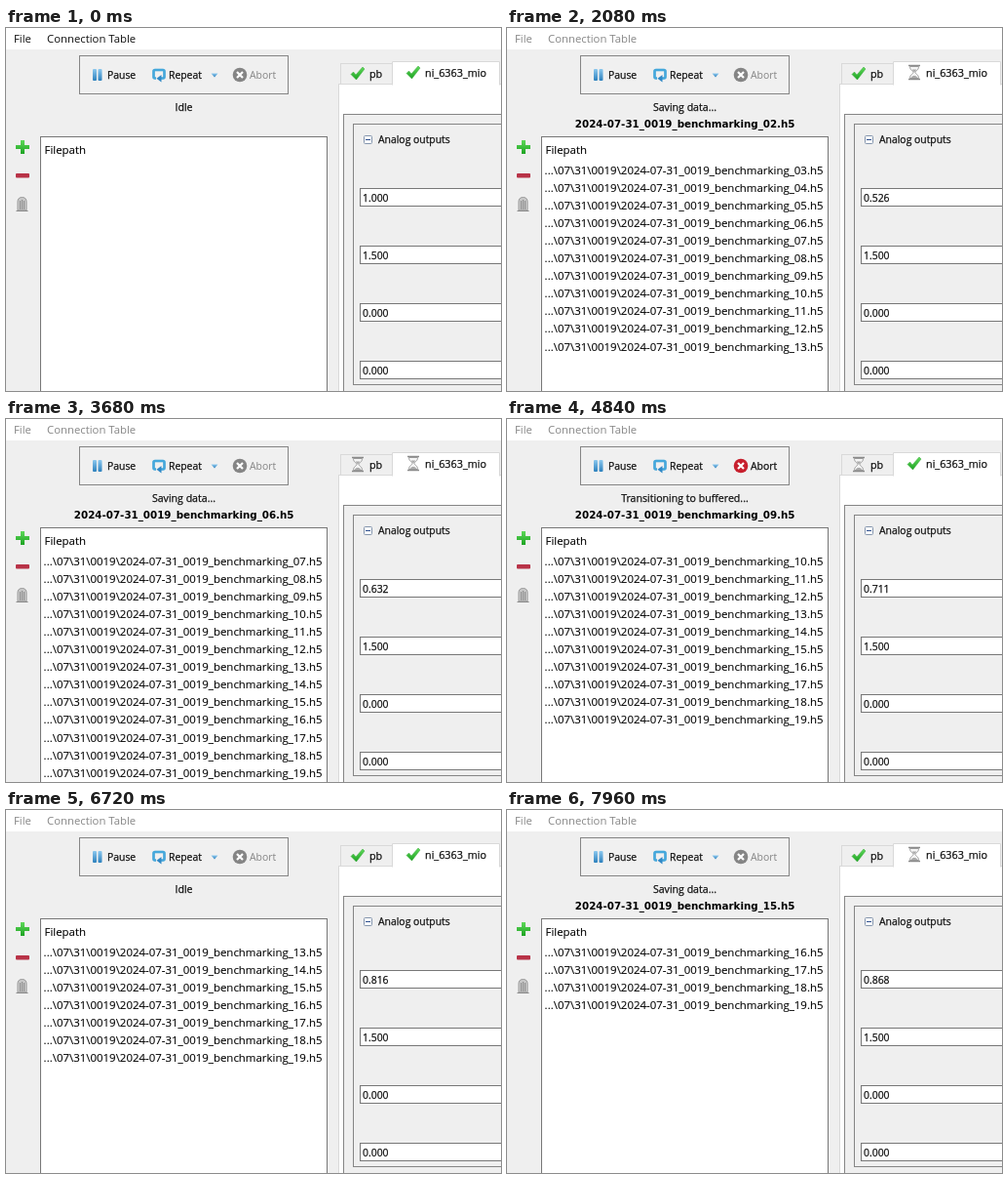
Animation of 508 by 372 pixels, one loop 8000 ms. Source, as an HTML page:

```html
<!DOCTYPE html>
<html lang="en">
<head>
<meta charset="utf-8">
<title>Shot queue</title>
<style>
html, body { margin: 0; width: 100%; height: 100%; overflow: hidden; background: #efefef; }
svg { display: block; width: 508px; height: 372px; }
text { font: 10.4px "Open Sans", "Noto Sans", sans-serif; fill: #111; white-space: pre; }
.list { font-size: 11.45px; fill: #000; stroke: #000; stroke-width: .1px; }
.menu { font-size: 11.35px; }
.heavy { stroke: #111; stroke-width: .25px; }
.status { font-size: 10.6px; text-anchor: middle; }
.file { font: bold 10.3px "DejaVu Sans", sans-serif; text-anchor: middle; fill: #000; }
.tab { font-size: 10.8px; }
.off { fill: #858585; stroke: none; }
</style>
</head>
<body>
<svg viewBox="0 0 508 372">
  <defs>
    <linearGradient id="blue" x2="0" y2="1">
      <stop stop-color="#8cc8ee"/><stop offset="1" stop-color="#2c80bd"/>
    </linearGradient>
    <linearGradient id="green" x2="0" y2="1">
      <stop stop-color="#5fd95a"/><stop offset="1" stop-color="#1da322"/>
    </linearGradient>
    <g id="check">
      <path d="M-7 1L-4.500-1.500L-2 1.500L5-6.500L7-4.500L-1.500 6.500Z" fill="url(#green)" stroke="#3aa83c" stroke-width=".5"/>
    </g>
    <g id="wait">
      <path d="M-4.500-6C-4.500-2-1-1.500-1 0S-4.500 2-4.500 6H4.500C4.500 2 1 1.500 1 0S4.500-2 4.500-6Z" fill="#f5f5f5" stroke="#a0a0a0"/>
      <path d="M-2.500-3H2.500L0 0ZM-3.500 5.500Q0 1 3.500 5.500Z" fill="#aaa"/>
      <path d="M-6-7H6M-6 7H6" stroke="#8a8a8a" stroke-width="1.500"/>
    </g>
  </defs>

  <rect width="508" height="372" fill="#efefef"/>
  <rect width="508" height="22" fill="#fff"/>
  <g id="menu">
    <text class="menu" x="8" y="15">File</text>
    <text class="menu" x="42" y="15">Connection Table</text>
  </g>

  <rect x="75.500" y="28.500" width="214" height="39" fill="#f0f0f0" stroke="#858585"/>
  <g fill="url(#blue)">
    <rect x="89" y="42" width="4" height="12" rx="1"/>
    <rect x="94.500" y="42" width="4" height="12" rx="1"/>
    <path d="M210.500 46.500H217.500L214 50.500Z"/>
  </g>
  <g fill="none">
    <path id="ring" d="M154 51.500H153Q151.500 51.500 151.500 50V44.500Q151.500 43 153 43H161Q162.500 43 162.500 44.500V50Q162.500 51.500 161 51.500H159" stroke="#3c92cf" stroke-width="2.600"/>
    <use href="#ring" style="filter: brightness(1.6)" opacity=".25"/>
  </g>
  <path d="M159.500 48V55.500L154.500 51.700Z" fill="#3088c6"/>
  <text class="heavy" x="104" y="52">Pause</text>
  <text class="heavy" x="167" y="52">Repeat</text>
  <circle id="stop" cx="240" cy="48" r="7.300"/>
  <path d="M237 45L243 51M243 45L237 51" stroke="#fff" stroke-width="2.200"/>
  <text id="abort" x="250" y="52">Abort</text>

  <text id="status" class="status heavy" x="182.500" y="85"></text>
  <text id="file" class="file" x="182.700" y="102"></text>

  <path d="M15 115H19V120H24V124H19V129H15V124H10V120H15Z" fill="url(#green)"/>
  <rect x="10" y="149" width="14" height="4.500" rx="1" fill="#b83247"/>
  <path d="M12 187V178Q12 173.500 16.500 173.500T21 178V187Z" fill="#c8c8c8" stroke="#999"/>
  <path d="M14.500 177V186M16.500 176V186M18.500 177V186M10.500 187.500H22.500" stroke="#8a8a8a"/>

  <rect x="35.500" y="111.500" width="294" height="270" fill="#fff" stroke="#777"/>
  <text class="list" x="39.500" y="129">Filepath</text>
  <g id="rows"></g>

  <rect x="341.500" y="57.500" width="180" height="330" fill="#fff" stroke="#d9d9d9"/>
  <rect x="343.500" y="36.500" width="53" height="21" fill="#efefef" stroke="#d9d9d9"/>
  <path d="M396.500 58.500V34.500H506.500V58.500" fill="#fff" stroke="#d9d9d9"/>
  <use id="pb" x="361" y="46.500"/>
  <text class="tab heavy" x="373" y="51">pb</text>
  <use id="ni" x="418" y="45.500"/>
  <text class="tab heavy" x="430" y="50">ni_6363_mio</text>

  <rect x="346.500" y="88.500" width="180" height="300" fill="#efefef" stroke="#858585"/>
  <rect x="356.500" y="98.500" width="170" height="267" fill="none" stroke="#858585"/>
  <rect x="367.500" y="110.500" width="8" height="8" rx="1" fill="#fff" stroke="#8394ad"/>
  <path d="M369 114.500H374" stroke="#2d4f8e"/>
  <text class="heavy" x="382" y="118">Analog outputs</text>
  <g id="fields"></g>
</svg>
<script>
const LOOP = 8000, STEP = 40, SHOTS = 20;
const GREY_MENU = 400;
// Moment each shot leaves the queue; the last entry closes the final cycle.
const starts = [600, 1340, 1750, 2160, 2570, 2980, 3390, 3800, 4290, 4780,
                5280, 5800, 6300, 6750, 7170, 7600, 8040];
// Phase limits, in ms before the next shot starts.
const SAVE = 150, PB_DONE = 90, IDLE = 40, RUN = 140;
const compiledAt = n => 555 + 117 * n;

const $ = id => document.getElementById(id);
const pad = n => String(n).padStart(2, "0");
const shotName = n => `2024-07-31_0019_benchmarking_${pad(n)}.h5`;

function add(parent, tag, attrs) {
  const el = document.createElementNS("http://www.w3.org/2000/svg", tag);
  for (const key in attrs) el.setAttribute(key, attrs[key]);
  return parent.appendChild(el);
}

const rows = Array.from({ length: 13 }, (_, i) =>
  add($("rows"), "text", { class: "list", x: 38.6, y: 150 + 18.05 * i }));

const fields = ["1.000", "1.500", "0.000", "0.000"].map((value, i) => {
  const y = 164.5 + 59 * i;
  add($("fields"), "rect", { x: 363.5, y, width: 160, height: 18, fill: "#fff", stroke: "#777" });
  const label = add($("fields"), "text", { class: "heavy", x: 366, y: y + 13 });
  label.textContent = value;
  return label;
});

function stateAt(t) {
  const shot = starts.filter(s => s <= t).length - 1;
  const state = { shot, done: shot - 1, status: "Idle", pb: false, ni: false, abort: false };
  if (shot < 0) return state;
  const since = t - starts[shot], left = starts[shot + 1] - t;
  if (left <= IDLE) {
    state.done = shot;
  } else if (left <= SAVE) {
    state.status = "Saving data...";
    state.pb = left > PB_DONE;
    state.ni = true;
  } else {
    const running = left <= SAVE + RUN;
    state.status = running ? "Running (program time: 0.130s)..." : "Transitioning to buffered...";
    state.pb = !running;
    state.ni = !running && since < 40;
    state.abort = true;
  }
  return state;
}

function draw(t) {
  const s = stateAt(t);
  let compiled = 0;
  while (compiled < SHOTS && compiledAt(compiled) <= t) compiled++;

  $("menu").setAttribute("opacity", t < GREY_MENU ? 1 : 0.5);
  $("status").textContent = s.status;
  $("file").textContent = s.status === "Idle" ? "" : shotName(s.shot);
  $("stop").setAttribute("fill", s.abort ? "#c71f2d" : "#858585");
  $("abort").setAttribute("class", s.abort ? "heavy" : "off");
  $("pb").setAttribute("href", s.pb ? "#wait" : "#check");
  $("ni").setAttribute("href", s.ni ? "#wait" : "#check");
  fields[0].textContent = s.done < 0 ? "1.000" : (0.5 + 0.5 * s.done / (SHOTS - 1)).toFixed(3);
  rows.forEach((row, i) => {
    const n = s.shot + 1 + i;
    row.textContent = n < compiled ? "...\\07\\31\\0019\\" + shotName(n) : "";
  });
}

const origin = performance.now();
function tick() {
  const t = (performance.now() - origin) % LOOP;
  draw(Math.floor(t / STEP) * STEP);
  requestAnimationFrame(tick);
}
draw(0);
requestAnimationFrame(tick);
</script>
</body>
</html>
```
